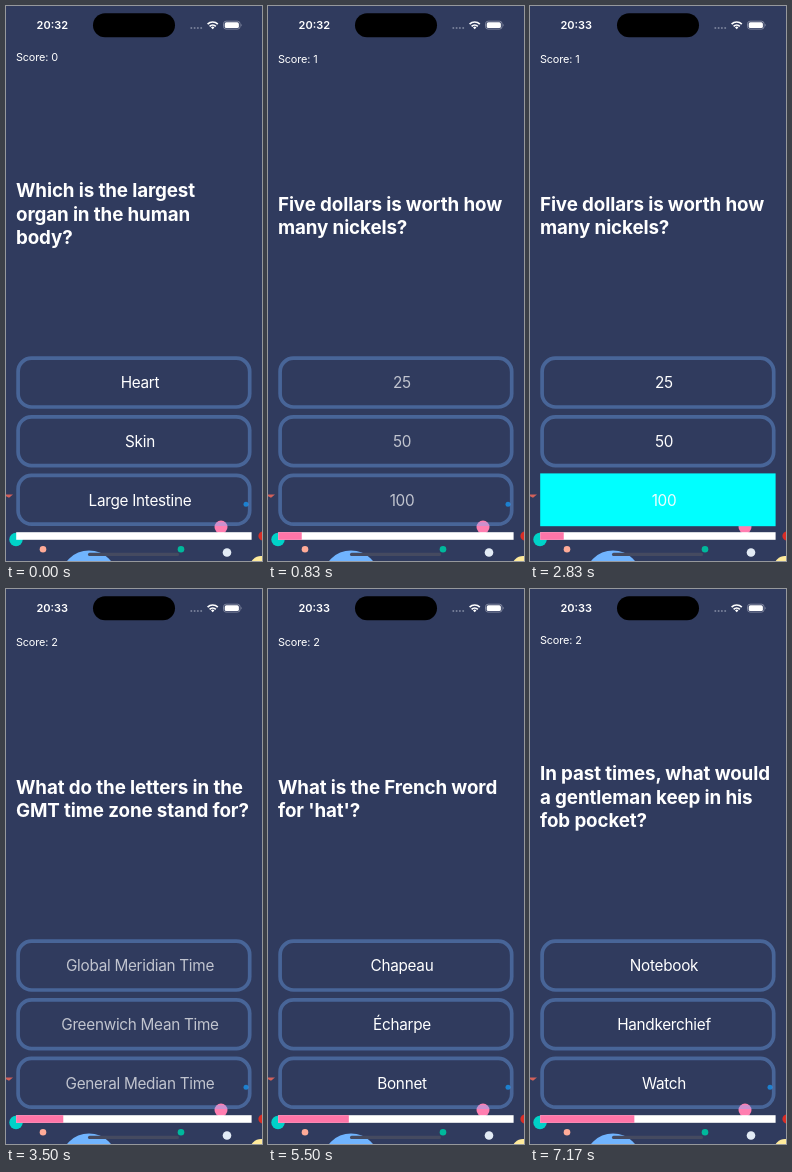
These frames come from a looping animation (256x555 px, 8000 ms). An HTML page:

```html
<!DOCTYPE html>
<html lang="en">
<head>
<meta charset="utf-8">
<title>Quiz</title>
<style>
  html, body { margin: 0; width: 100%; height: 100%; overflow: hidden; background: #303b5e; }
  svg { display: block; width: 256px; height: 555px; font-family: Inter, sans-serif; fill: #fff; }
  #clock { font-size: 11px; font-weight: 600; text-anchor: middle; }
  #score { font-size: 10.9px; letter-spacing: -.12px; }
  #question { font-size: 18.8px; font-weight: 700; letter-spacing: -.12px; }
  .answer { font-size: 15.3px; letter-spacing: -.28px; text-anchor: middle; }
  .border { fill: none; stroke: rgb(115 175 255 / .36); stroke-width: 3.7; }
</style>
</head>
<body>
<svg viewBox="0 0 256 555">
  <rect width="256" height="555" fill="#303b5e"/>

  <!-- Bubbles -->
  <path d="M0 488.5h7l-4 3.2-3-1.5z" fill="#d2615a"/>
  <circle cx="10" cy="533.5" r="6.7" fill="#00d2c8"/>
  <circle cx="37" cy="543.3" r="3.3" fill="#ffab98"/>
  <circle cx="83" cy="572.6" r="28.2" fill="#70b4ff"/>
  <circle cx="175" cy="543.3" r="3.3" fill="#00b89c"/>
  <circle cx="215" cy="521.1" r="6.5" fill="#ff7eb0"/>
  <circle cx="221" cy="546.5" r="4.3" fill="#e2ebf5"/>
  <circle cx="240" cy="498.3" r="2.5" fill="#1c80cf"/>
  <circle cx="257" cy="530" r="4.6" fill="#d92d26"/>
  <circle cx="255" cy="561" r="11" fill="#ffeb9c"/>

  <!-- Status bar -->
  <text id="clock" x="46.3" y="23"></text>
  <rect x="87" y="7.2" width="82" height="24" rx="12" fill="#000"/>
  <g fill="#78809a">
    <circle cx="185.3" cy="22" r="1"/><circle cx="188.6" cy="22" r="1"/>
    <circle cx="191.9" cy="22" r="1"/><circle cx="195.2" cy="22" r="1"/>
  </g>
  <g fill="none" stroke="#fff" stroke-width="1.7">
    <path d="M201.6 18.1a7.3 7.3 0 0 1 10.2 0"/>
    <path d="M203.6 20.3a4.4 4.4 0 0 1 6.2 0"/>
  </g>
  <path d="M206.7 23.2l-1.7-1.8a2.4 2.4 0 0 1 3.4 0z"/>
  <rect x="217.5" y="15.2" width="16.6" height="7.9" rx="2.6" fill="none" stroke="#8e95ab" stroke-width=".8"/>
  <rect x="218.7" y="16.3" width="14.2" height="5.7" rx="1.6"/>
  <path d="M235 17.7q1.3 1.4 0 2.8z" fill="#8e95ab"/>

  <text id="score" x="9.9"></text>
  <g id="question"></g>
  <g id="buttons"></g>
  <rect x="10.2" y="526.2" width="235.4" height="7.6"/>
  <rect id="progress" x="10.2" y="526.2" height="7.6" fill="#ff75a8"/>
  <rect x="82" y="546.8" width="91" height="3.2" rx="1.6" fill="#454a60"/>
</svg>
<script>
const LOOP = 8000, STEP = 330;
const RIGHT = '#0ff', WRONG = '#f0f';
const rounds = [
  { at: -STEP, score: 0, lines: ['Which is the largest', 'organ in the human', 'body?'],
    answers: ['Heart', 'Skin', 'Large Intestine'], pick: 1, pressAt: 500, color: RIGHT },
  { at: 830, score: 1, lines: ['Five dollars is worth how', 'many nickels?'],
    answers: ['25', '50', '100'], pick: 2, pressAt: 2830, color: RIGHT },
  { at: 3500, score: 2, lines: ['What do the letters in the', 'GMT time zone stand for?'],
    answers: ['Global Meridian Time', 'Greenwich Mean Time', 'General Median Time'], pick: 0, pressAt: 4830, color: WRONG },
  { at: 5170, score: 2, lines: ['What is the French word', "for 'hat'?"],
    answers: ['Chapeau', 'Écharpe', 'Bonnet'], pick: 1, pressAt: 5830, color: WRONG },
  { at: 6500, score: 2, lines: ['In past times, what would', 'a gentleman keep in his', 'fob pocket?'],
    answers: ['Notebook', 'Handkerchief', 'Watch'], pressAt: Infinity }
];

const $ = id => document.getElementById(id);
const buttonTop = i => 350.2 + 58.6 * i;

$('buttons').innerHTML = [0, 1, 2].map(i => `
  <rect class="fill" x="10.2" y="${buttonTop(i)}" width="235.4" height="52.8"/>
  <rect class="border" x="12.1" y="${buttonTop(i) + 2}" width="231.6" height="48.8" rx="13.5"/>
  <text class="answer" x="134" y="${buttonTop(i) + 32.1}"></text>`).join('');
const [fills, borders, labels] = ['.fill', '.border', '.answer'].map(s => document.querySelectorAll(s));

function showRound(index) {
  const { score, lines, answers } = rounds[index];
  const tall = lines.length === 3;
  $('score').textContent = 'Score: ' + score;
  $('score').setAttribute('y', tall ? 55.3 : 57);
  $('question').innerHTML = lines.map((line, i) =>
    `<text x="10" y="${(tall ? 191.4 : 204.5) + 23.3 * i}">${line}</text>`).join('');
  labels.forEach((label, i) => label.textContent = answers[i]);
  $('progress').setAttribute('width', 23.54 * index);
}

let shown = -1;
function draw() {
  const t = performance.now() % LOOP;
  const index = rounds.findLastIndex(r => t >= r.at);
  if (index !== shown) showRound(shown = index);

  const { at, pick, pressAt, color } = rounds[index];
  const pressed = t >= pressAt;
  const entering = t < at + STEP;
  $('clock').textContent = t < 2830 ? '20:32' : '20:33';
  labels.forEach((label, i) => {
    const active = pressed && i === pick;
    fills[i].setAttribute('fill', active ? color : 'none');
    borders[i].style.visibility = active && color === RIGHT ? 'hidden' : 'visible';
    label.setAttribute('fill-opacity', entering ? .7 : active ? .92 : 1);
  });
  requestAnimationFrame(draw);
}
draw();
</script>
</body>
</html>
```
